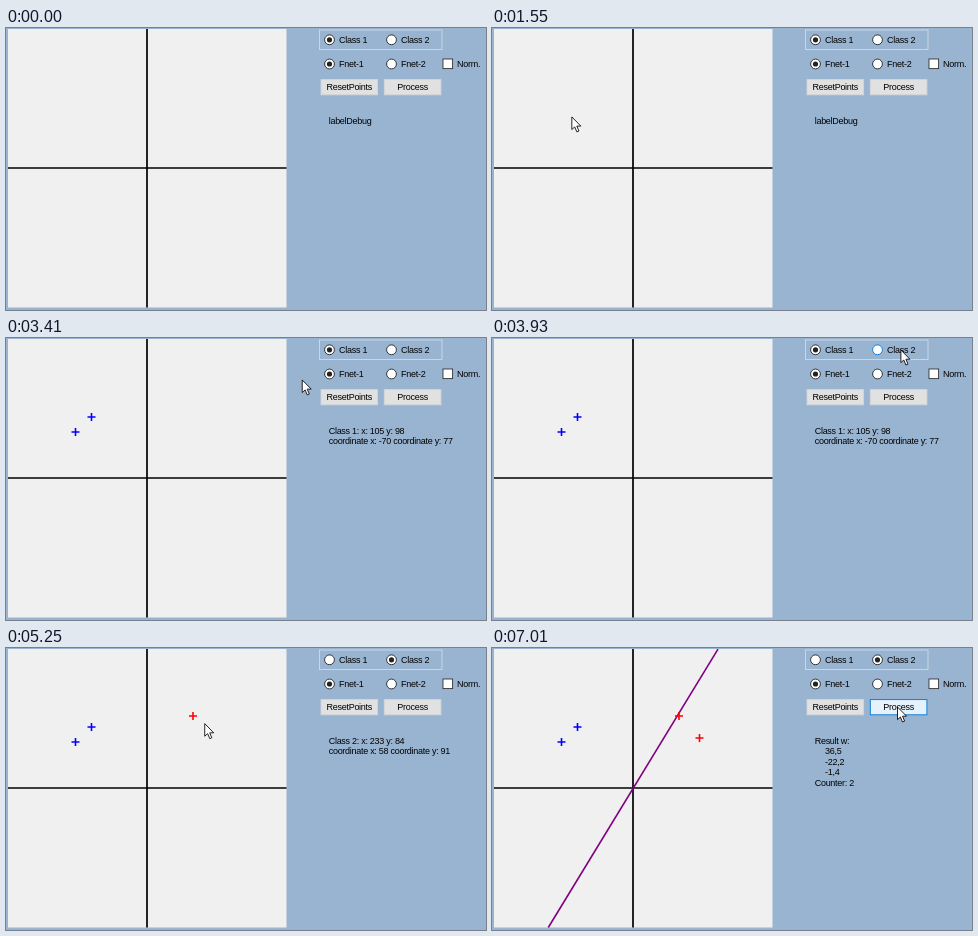
Write an HTML page that moves like this. It is 480 px wide and 282 px high and loops after 8000 ms.

```html
<!DOCTYPE html>
<html lang="en">
<head>
<meta charset="utf-8">
<title>Point classifier</title>
<style>
html, body { margin: 0; width: 100%; height: 100%; overflow: hidden; background: #99b4d1; }
svg { display: block; width: 100vw; height: 100vh; }
text { font: 9px "Liberation Sans", Arial, sans-serif; letter-spacing: -.28px; fill: #000; white-space: pre; }
</style>
</head>
<body>
<svg id="stage" viewBox="0 0 480 282"></svg>
<script>
const LOOP = 8000;
const stage = document.getElementById('stage');

function add(tag, attrs, text) {
  const el = document.createElementNS('http://www.w3.org/2000/svg', tag);
  set(el, attrs);
  if (text) el.textContent = text;
  return stage.appendChild(el);
}
function set(el, attrs) {
  for (const k in attrs) el.setAttribute(k, attrs[k]);
}
const show = (el, on) => set(el, { visibility: on ? 'visible' : 'hidden' });

// Plot area
add('rect', { width: 480, height: 282, fill: '#99b4d1' });
add('rect', { x: 2, y: 1, width: 278.5, height: 278.5, fill: '#f0f0f0' });
add('path', { d: 'M141 1V279.5M2 140H280.5', stroke: '#000', 'stroke-width': 1.7 });

const boundary = add('path', { d: 'M56.3 279.5L226 1.2', stroke: '#800080', 'stroke-width': 1.6 });

const points = [
  { at: 1910, x: 69.5, y: 94, color: '#00f' },
  { at: 2760, x: 85.5, y: 79, color: '#00f' },
  { at: 4850, x: 187, y: 68, color: '#f00' },
  { at: 5630, x: 207.5, y: 90, color: '#f00' }
];
for (const p of points) {
  p.el = add('path', {
    d: `M${p.x - 4} ${p.y}h8M${p.x} ${p.y - 4}v8`, stroke: p.color, 'stroke-width': 1.6
  });
}

// Controls
add('rect', { x: 313.5, y: 2, width: 122.5, height: 19.5, fill: 'none', stroke: '#d5dfe9', 'stroke-width': .8 });

function radio(x, y, label, isOn) {
  const ring = add('circle', { cx: x, cy: y, r: 4.9, fill: '#fff', 'stroke-width': .9 });
  const dot = add('circle', { cx: x, cy: y, r: 2.6 });
  add('text', { x: x + 9.6, y: y + 3.4 }, label);
  return { ring, dot, isOn, box: [x - 5, y - 6, 43, 12] };
}
const radios = [
  radio(323.5, 11.8, 'Class 1', t => t < 4000),
  radio(385.5, 11.8, 'Class 2', t => t >= 4000),
  radio(323.5, 36, 'Fnet-1', () => true),
  radio(385.5, 36, 'Fnet-2', () => false)
];
add('rect', { x: 437, y: 31, width: 9.6, height: 9.6, fill: '#fff', stroke: '#333', 'stroke-width': .9 });
add('text', { x: 451, y: 39.4 }, 'Norm.');

function button(x, label) {
  const rect = add('rect', { x, y: 51.6, width: 56.6, height: 15.2, 'stroke-width': .9 });
  add('text', { x: x + 28.3, y: 62.4, 'text-anchor': 'middle' }, label);
  return { rect, box: [x, 51, 57.5, 16] };
}
const reset = button(315, 'ResetPoints');
const process = button(378.3, 'Process');

// Status label
const lines = Array.from({ length: 5 }, (_, i) => add('text', { y: 96 + i * 10.4 }));

function clickInfo(group, x, y) {
  return [`Class ${group}: x: ${x} y: ${y}`, `coordinate x: ${x - 175} coordinate y: ${175 - y}`];
}
const messages = [
  [0, ['labelDebug']],
  [1910, clickInfo(1, 85, 117)],
  [2760, clickInfo(1, 105, 98)],
  [4850, clickInfo(2, 233, 84)],
  [5630, clickInfo(2, 259, 112)],
  [6970, ['Result w:', ' 36,5', ' -22,2', ' -1,4', 'Counter: 2']]
];

// Pointer: [time, x, y]
const cursor = add('path', {
  d: 'M0 0V12.6L2.9 10L5 15L7.1 14.1L5 9.2H9Z',
  fill: '#fff', stroke: '#000', 'stroke-width': .85
});
const path = [
  [310, 413, 284], [600, 372, 130], [930, 307, 1], [1090, 208, 23], [1120, 206, 25],
  [1300, 130, 64], [1690, 69.5, 94], [1980, 69.5, 94], [2320, 86, 79], [2810, 86, 79],
  [3410, 296, 42], [3560, 322, 34], [3940, 409, 12], [4060, 409, 12], [4380, 268, 53],
  [4440, 247, 59], [4780, 187, 68], [4920, 187, 68], [5190, 197, 73], [5230, 198, 74.5],
  [5480, 208, 90], [5680, 208, 90], [6080, 368, 62], [6260, 405.5, 59], [LOOP, 405.5, 59]
];

const slope = (i, k) => (path[i + 1][k] - path[i][k]) / (path[i + 1][0] - path[i][0]);

// Monotone tangent: flat at holds and turns
function tangent(i, k) {
  if (i === 0 || i === path.length - 1) return 0;
  const a = slope(i - 1, k), b = slope(i, k);
  return a * b <= 0 ? 0 : 2 * a * b / (a + b);
}
function pointer(t) {
  let i = 0;
  while (i < path.length - 2 && t >= path[i + 1][0]) i++;
  const span = path[i + 1][0] - path[i][0];
  const u = Math.max(0, (t - path[i][0]) / span);
  const ease = u * u * (3 - 2 * u);
  return [1, 2].map(k =>
    path[i][k] + (path[i + 1][k] - path[i][k]) * ease +
    span * u * (1 - u) * ((1 - u) * tangent(i, k) - u * tangent(i + 1, k)));
}

function paintButton(b, over, pressed) {
  set(b.rect, {
    fill: pressed ? '#cce4f7' : over ? '#e5f1fb' : '#e1e1e1',
    stroke: pressed ? '#005499' : over ? '#0078d7' : '#d3d6d9'
  });
}

function render(t) {
  const [px, py] = pointer(t);
  const hit = ([x, y, w, h]) => t > 310 && px >= x && px <= x + w && py >= y && py <= y + h;

  set(cursor, { transform: `translate(${px} ${py})` });
  show(cursor, t >= 310);

  for (const p of points) show(p.el, t >= p.at);
  show(boundary, t >= 6970);

  for (const r of radios) {
    const color = hit(r.box) ? '#0078d7' : '#222';
    set(r.ring, { stroke: color });
    set(r.dot, { fill: color });
    show(r.dot, r.isOn(t));
  }
  paintButton(reset, hit(reset.box), false);
  paintButton(process, hit(process.box), t >= 6820 && t < 7010);

  const message = messages.filter(m => t >= m[0]).pop()[1];
  lines.forEach((el, i) => {
    const s = message[i] || '';
    el.textContent = s.trim();
    set(el, { x: s[0] === ' ' ? 333 : 322.7 });
  });
}

const start = performance.now();
function tick() {
  render((performance.now() - start) % LOOP);
  requestAnimationFrame(tick);
}
tick();
</script>
</body>
</html>
```
